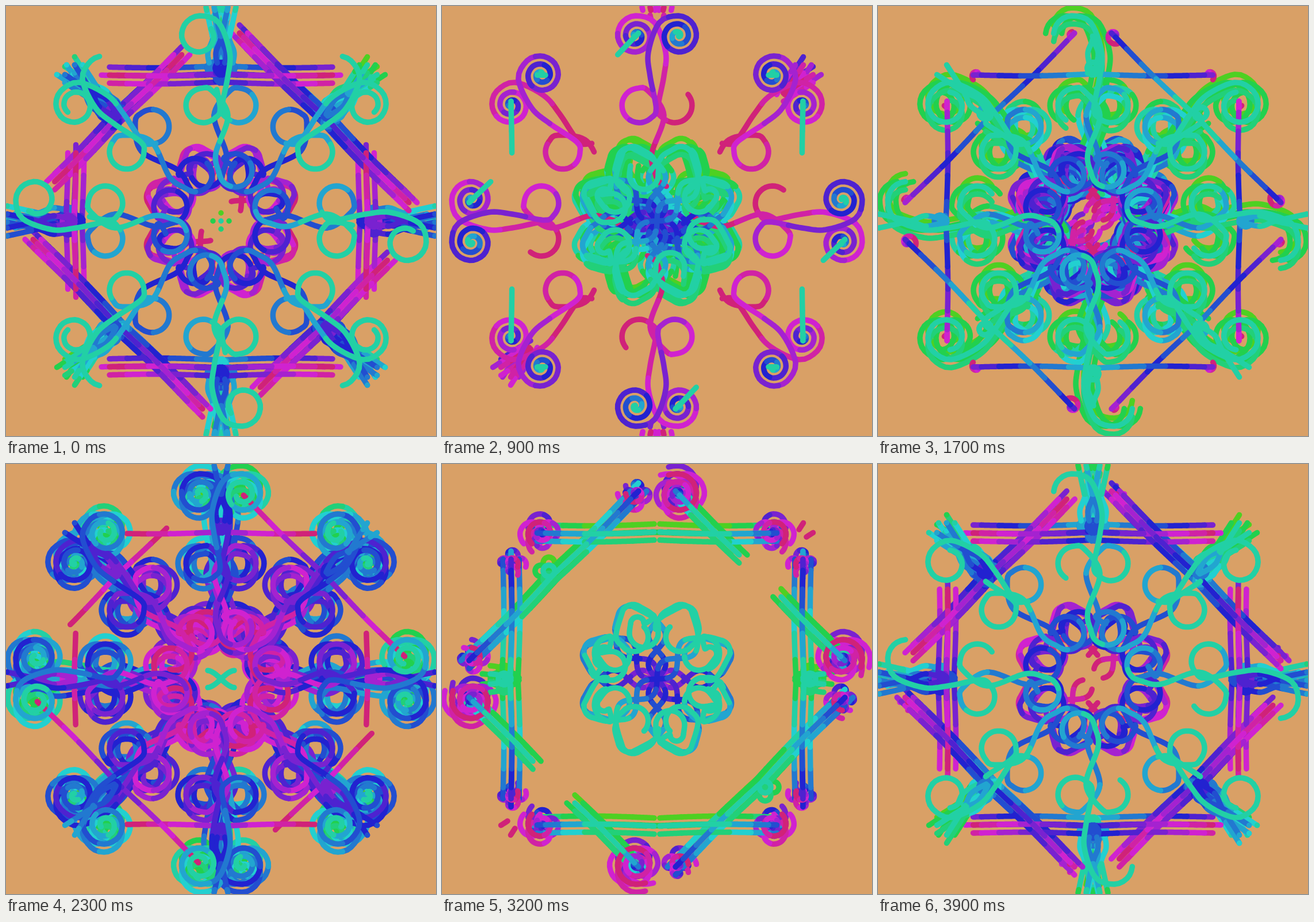
Recreate the animation shown at these times as an HTML page with a canvas. Size 748 by 748 pixels, loop 4000 ms.

```html
<!DOCTYPE html>
<html>
<head>
<meta charset="utf-8">
<style>
html, body { margin: 0; overflow: hidden; background: #d9a066; }
canvas { display: block; }
</style>
</head>
<body>
<canvas id="stage" width="748" height="748"></canvas>
<script>
const ctx = document.getElementById('stage').getContext('2d');
const H = Math.SQRT1_2, TAU = 2 * Math.PI, LIFE = 13, PERIOD = 40;

// Each piece returns knots [time, x, y], y pointing outward along the upper arm.
const sample = (n, rule) => Array.from({ length: n + 1 }, (_, i) => rule(i / n));
const arc = (start, end, cx, cy, r, from, to) => sample(8, f => {
  const a = (from + (to - from) * f) * TAU / 360;
  return [start + (end - start) * f, cx + r * Math.cos(a), cy + r * Math.sin(a)];
});
const onLeftArm = knots => knots.map(([t, a, b]) => [t, H * (a - b), H * (a + b)]);

const rosette = sample(12, f => [5 * f, 15 * Math.sin(TAU * 1.14 * f), 115 * f]);
const spiral = sample(20, f => {
  const k = 2.5 * f, a = TAU * (k + 0.25), r = 35 * (1 - f);
  return [15.7 + 1.3 * k + 0.35 * k ** 3, -37 + r * Math.cos(a), 322 + r * Math.sin(a)];
});
const tip = [[32, -9, 290], [32.7, 0, 318], [34, 12, 372]];

const knots = [
  ...onLeftArm(rosette),
  ...arc(5.3, 6, -48, 107, 20, 170, 70), [6.4, -2, 103],
  ...arc(6.7, 7.8, -23, 80, 25, 0, -180),
  ...arc(8, 8.6, -34, 96, 12, 180, 0),
  ...arc(8.8, 11.1, -25, 88, 29, 45, 355),
  [11.4, 9, 118], [12, -12, 184],
  ...arc(12.5, 14.3, 31, 201, 30, 120, -170),
  [14.8, 12, 252], [15.2, 15, 294], [15.5, -4, 345],
  ...spiral,
  [27.5, -107, 250],
  ...onLeftArm([...arc(30, 31.5, 0, 266, 10, -90, -450), ...tip])
];

function pointAt(t) {
  let i = 0;
  while (i < knots.length - 2 && knots[i + 1][0] <= t) i++;
  const p = knots[i], q = knots[i + 1];
  const o = knots[Math.max(0, i - 1)], r = knots[Math.min(knots.length - 1, i + 2)];
  const f = Math.max(0, Math.min(1, (t - p[0]) / (q[0] - p[0])));
  return [1, 2].map(k => p[k] + f / 2 * (q[k] - o[k] +
    f * (2 * o[k] - 5 * p[k] + 4 * q[k] - r[k] + f * (3 * (p[k] - q[k]) + r[k] - o[k]))));
}

const STEP = 0.05, END = knots[knots.length - 1][0];
const path = sample(Math.round(END / STEP), f => {
  const [x, y] = pointAt(f * END);
  return [x, -y];
});

// Sixteen mirrored pens in four groups, each with its own delay.
const flips = [[1, 0, 0, 1], [-1, 0, 0, -1], [-1, 0, 0, 1], [1, 0, 0, -1]];
const turns = [[1, 0, 0, 1], [-1, 0, 0, -1], [0, 1, 1, 0], [0, -1, -1, 0]];
const times = ([a, b, c, d], [e, f, g, h]) => [a * e + b * g, a * f + b * h, c * e + d * g, c * f + d * h];
const mirror = [-1, 0, 0, 1], diagonal = [H, H, -H, H];
const groups = [
  { lag: 2.4, views: turns.map(m => times(m, mirror)) },
  { lag: 1.2, views: flips.map(m => times(m, times(diagonal, mirror))) },
  { lag: 0, views: turns },
  { lag: -1, views: flips.map(m => times(m, diagonal)) }
];

function trace(from, to, views, dx, dy) {
  const first = Math.max(0, Math.round(from / STEP));
  const last = Math.min(path.length - 1, Math.round(to / STEP));
  if (first > last) return;
  for (const [a, b, c, d] of views) {
    for (let i = first; i <= last; i++) {
      const [x, y] = path[i];
      const px = 374 + dx + a * x + b * y, py = 374 + dy + c * x + d * y;
      if (i === first) ctx.moveTo(px, py);
      ctx.lineTo(px, py);
    }
  }
}

function stroke(time, age, [dx, dy, shift]) {
  ctx.strokeStyle = `hsl(${165 + shift + (age < 3 ? 0 : 15 * (age - 1))}, 72%, 47.5%)`;
  ctx.beginPath();
  for (const { lag, views } of groups) {
    const to = time - lag - age;
    trace(to - 1, to, views, dx, dy);
  }
  ctx.stroke();
}

// Brush dots are [x, y, hue shift]; the plain pen uses only the centre.
const centre = [0, 0, 0];
const comb = [[0, -14, -60], [-14, 0, -30], [14, 0, -30], [0, 14, -15], centre];
const laps = [PERIOD, 0, -PERIOD];

function draw() {
  const tick = Math.floor(performance.now() / 100) % PERIOD;
  const combTime = (tick + 39) % PERIOD, penTime = (tick + 17) % PERIOD;
  ctx.fillStyle = '#d9a066';
  ctx.fillRect(0, 0, 748, 748);
  ctx.lineWidth = 9.5;
  ctx.lineCap = ctx.lineJoin = 'round';
  for (const dot of comb) {
    for (let age = LIFE - 1; age >= 0; age--) {
      for (const lap of laps) {
        stroke(combTime + lap, age, dot);
        if (dot === centre) stroke(penTime + lap, age, dot);
      }
    }
  }
  requestAnimationFrame(draw);
}
draw();
</script>
</body>
</html>
```
